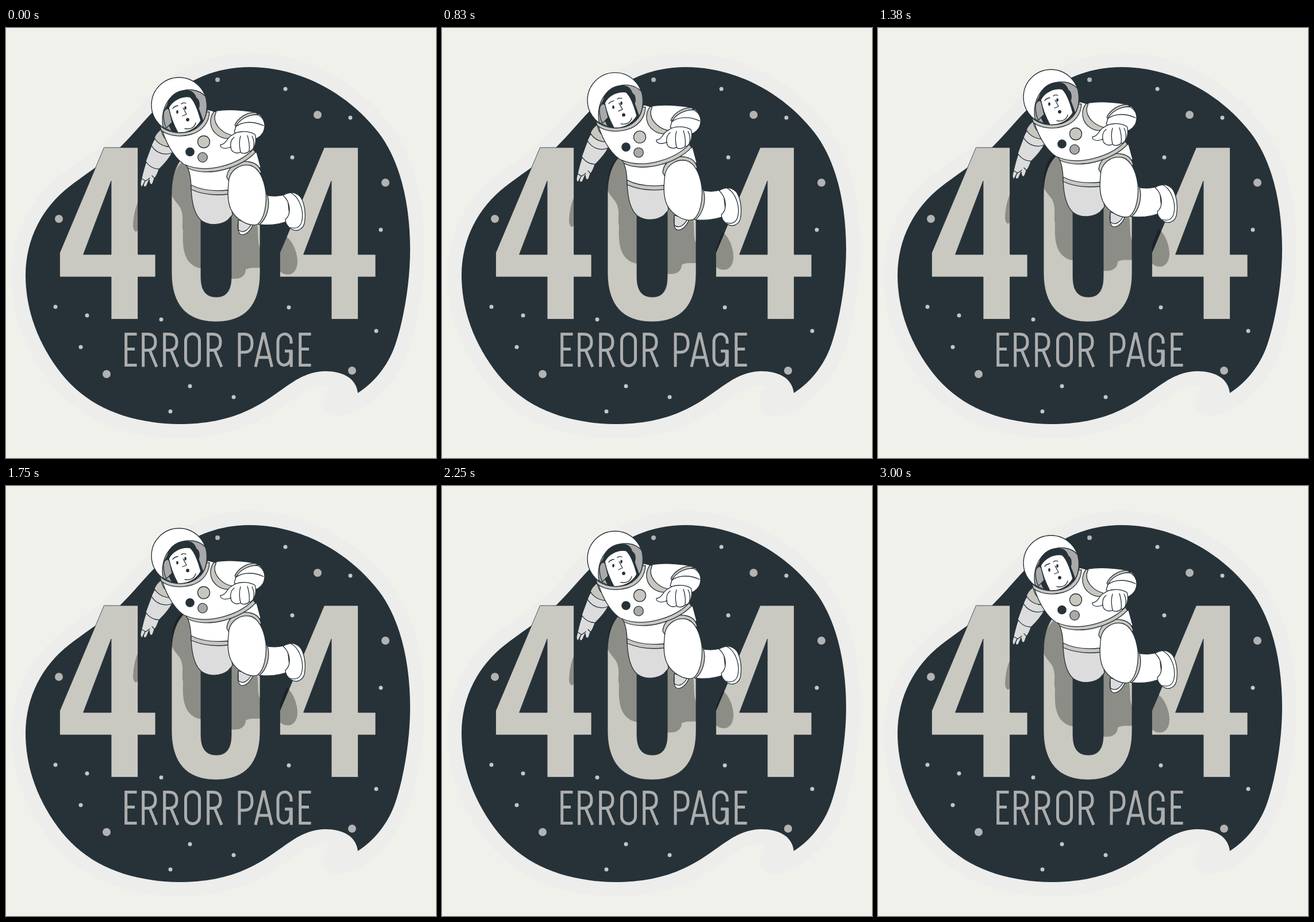
An HTML page that plays this animation: 748 by 748 pixels, repeating every 3040 ms.

```html
<!DOCTYPE html>
<html lang="en">
<head>
<meta charset="utf-8">
<title>Error page</title>
<style>
html, body { margin: 0; width: 100%; height: 100%; overflow: hidden; background: #f0f1eb }
svg { display: block; width: 100%; height: 100% }
.ink { fill: #263238 }
.digit { fill: #cac9c1; stroke: #263238; stroke-width: .8; fill-rule: evenodd }
.letters { fill: none; stroke: #adadad; stroke-width: 5 }
#hero { stroke: #263238; stroke-width: 1.3; stroke-linejoin: round; stroke-linecap: round; fill: #fff }
#hero .shadow { fill: #000; fill-opacity: .3; stroke: none }
#hero .pale { fill: #dcdcdc }
#hero .band { fill: #c8c7bf }
#hero .gray { fill: #a9a9a9 }
#hero .dark { fill: #263238 }
#hero .line { fill: none }
</style>
</head>
<body>
<svg viewBox="0 0 748 748">
  <defs>
    <path id="blob" d="M424 68C505 68 590 108 648 182C688 234 703 312 703 385C703 440 693 500 680 542C668 583 644 614 612 635C609 608 584 597 556 597C504 597 478 640 421 665C385 682 345 689 300 689C205 687 135 655 90 593C55 545 34 490 34 429C35 365 63 313 110 276C150 245 172 234 200 206C230 176 247 152 274 128C317 89 366 68 424 68Z"/>
    <path id="four" d="M170.500 208H229.500V394H260V433H229.500V506.500H183V433H93.500V391ZM183 266L134.500 394H183Z"/>
  </defs>

  <g fill="#ededec">
    <use href="#blob" stroke="#ededec" stroke-width="50" stroke-linejoin="round"/>
    <path d="M563 624C552 635 548 656 557 667C567 678 587 676 604 669C630 660 648 642 662 620L600 600Z"/>
  </g>
  <use href="#blob" class="ink"/>
  <g id="stars"></g>

  <use href="#four" class="digit"/>
  <use href="#four" class="digit" x="383"/>
  <path class="digit" d="M288 288C288 232 315 203 365 203C416 203 442 232 442 288V426C442 482 416 511 365 511C315 511 288 482 288 426ZM339 277V432C339 456 347 468 366 468C384 468 392 456 392 432V277C392 255 384 246 366 246C347 246 339 255 339 277Z"/>

  <g class="letters" role="img" aria-label="ERROR PAGE">
    <path id="e" d="M227.500 532.500H208.700V586.500H227.500M208.700 558.500H224"/>
    <path id="r" d="M238.700 589.500V532.500H246C256 532.500 260 537 260 546.500C260 556.500 255 560.500 246 560.500H238.700M250 560.500L262 589.500"/>
    <use href="#r" x="37"/>
    <rect x="312.500" y="532" width="24" height="55.500" rx="12"/>
    <use href="#r" x="113"/>
    <path d="M406 589.500V532.500H414C424 532.500 428 538 428 548.500C428 560 423 564 414 564H406"/>
    <path d="M434 589.500L447.500 532H449L462.500 589.500M438.500 573H458"/>
    <path d="M496 549V545C496 528 473 528 473 546V573C473 591 495 591 495 572V562H485M496.300 560V589.500"/>
    <use href="#e" x="303"/>
  </g>

  <g id="hero">
    <g class="shadow">
      <path d="M229.500 303C224 314 221 333 221 345C222 355 228 357 229.500 350Z"/>
      <path d="M306 234C293 244 288 262 288 290C292 302 304 308 306 321C309 334 305 343 308 353C307 375 308 392 317 405C323 413 331 417 339 418V300L322 250Z"/>
      <path d="M392 320V436C408 438 417 431 417 420C425 416 434 418 442 417V382C436 371 441 355 435 330Z"/>
      <path d="M488 363C499 371 507 391 507 407C506 431 488 433 477 424V391Z"/>
    </g>

    <!-- far leg and hips -->
    <path d="M404 336C402 347 404 356 408 359C417 362 426 352 430 341Z"/>
    <path class="pale" d="M404 334V351C413 359 422 350 427 341Z"/>
    <path class="pale" d="M322 278C323 306 329 326 340 335C354 345 374 343 386 334L394 325L388 285Z"/>
    <path d="M316 243C321 254 322 267 322 280C344 291 367 290 390 287L443 242L436 216Z"/>
    <path class="band" d="M322 273C343 284 366 284 386 282L387 289C364 292 343 290 322 281Z"/>

    <!-- near leg -->
    <path d="M449 290C466 294 478 293 489 288L494 334C480 341 465 344 441 342Z"/>
    <path d="M482 291C496 283 506 286 513 295C520 307 522 325 519 340C516 351 505 355 497 350C489 345 486 340 486 333C496 325 496 304 482 291Z"/>
    <path class="line" d="M494 286C510 293 518 316 515 334C513 347 504 350 495 347"/>
    <path class="band" d="M449 288L454 289C461 308 454 331 441 342L435 340C448 329 452 311 449 288Z"/>
    <path class="band" d="M384 260C385 240 406 229 424 233C435 235 442 242 444 252L390 270Z"/>
    <path d="M388 262C393 244 410 236 425 239C440 243 449 263 452 286C454 308 449 332 438 341C424 347 400 334 391 315C384 299 386 279 388 262Z"/>

    <!-- far arm -->
    <path class="pale" d="M244 232C240 244 237 256 235 265C233 271 234 277 237 276L242 266L239 273C240 278 244 278 246 271L249 264L250 270C252 274 255 272 256 268L258 262C263 257 265 249 267 243Z"/>
    <path class="line" d="M236 262L243 266L250 261M254 257L259 262"/>
    <path class="pale" d="M254 202C250 213 246 223 243 232C249 241 258 246 267 245C276 236 284 227 289 217Z"/>
    <path class="pale" d="M269 181C261 187 257 194 253 204C260 217 276 223 289 217L296 207L277 177Z"/>
    <path class="band" d="M270 176C263 181 260 186 258 191C264 202 278 209 292 206L287 198C278 196 272 190 270 176Z"/>

    <!-- chest -->
    <path d="M272 178C280 205 296 231 315 240C350 255 405 239 432 212L427 190L400 145L366 146L351 142L330 175Z"/>
    <path class="band" d="M312 238C349 254 404 238 430 211L434 216C409 244 350 260 317 244Z"/>
    <circle class="band" cx="344" cy="198" r="10.500"/>
    <circle class="dark" cx="320" cy="215.500" r="7.200"/>
    <circle class="gray" cx="342" cy="225" r="8.300"/>

    <!-- near arm -->
    <path class="band" d="M362 145C352 158 354 177 369 187C378 193 388 193 396 190L400 180L372 146Z"/>
    <path d="M366 144C386 141 411 143 430 146C447 149 453 164 448 176C443 190 427 197 412 195L398 187C379 186 362 170 363 154Z"/>
    <path class="band" d="M398 169C403 157 419 146 434 147L439 150C420 151 408 161 403 172Z"/>
    <path d="M400 171C407 158 423 150 438 151C450 157 453 170 447 182C441 192 431 195 421 194L397 181Z"/>
    <path class="line" d="M399 172C411 162 432 162 448 170"/>
    <path d="M394 186C402 179 421 178 433 185C436 193 434 205 430 210C427 214 424 215 423 214C419 219 411 219 408 216C400 220 391 215 391 207C380 212 372 208 373 203C383 203 384 190 394 186Z"/>
    <path class="line" d="M397 190C391 194 390 201 391 208M408 188C405 197 406 207 408 216M420 187C423 197 424 206 423 214M428 188C432 195 432 204 430 210"/>

    <!-- helmet and face -->
    <circle cx="301" cy="134" r="48"/>
    <path class="gray" d="M273 172C269 146 278 124 297 113C315 104 335 106 347 119C351 132 350 149 344 160C329 182 297 188 273 172Z"/>
    <path class="dark" d="M290 181C280 166 278 150 275 146C277 138 280 137 281 133C285 116 301 107 317 109C326 110 329 116 331 122C337 125 337 135 335 140L343 162L322 180Z"/>
    <path d="M283 139C289 126 305 118 320 120C328 126 334 143 339 161C330 177 314 183 299 182C292 169 286 154 283 139Z"/>
    <path class="gray" d="M274 151C274 142 281 137 284 143L289 164L279 174C276 168 274 160 274 151Z"/>
    <path class="line" d="M290 140Q293 136 299 135M305 132Q308 129 313 131M308 139L314 150L307 153M311 175C321 177 328 173 330 165"/>
    <g class="dark" stroke="none">
      <ellipse cx="298" cy="146" rx="1.800" ry="3"/>
      <ellipse cx="312" cy="139" rx="1.800" ry="3"/>
      <circle cx="316" cy="159.500" r="2.900"/>
    </g>
    <path class="band" d="M268 170C281 182 303 185 320 180C337 174 346 163 349 146L354 146C353 166 340 180 322 185C302 191 281 187 270 178Z"/>
  </g>
</svg>
<script>
const stars = [
  [368, 90, 4], [486, 106], [542, 151, 7], [599, 156], [498, 225], [660, 269, 7], [652, 351],
  [92, 332, 7], [86, 485], [141, 500], [270, 507], [130, 555], [175, 602, 7], [320, 623],
  [396, 642], [286, 667], [492, 486], [644, 527], [602, 596, 7]
];
document.getElementById('stars').innerHTML = stars.map(([x, y, r = 3.5]) =>
  `<circle cx="${x}" cy="${y}" r="${r}" fill="${r > 3.5 ? '#b3b3b3' : '#c6c6c1'}"/>`).join('');

const hero = document.getElementById('hero');
const LOOP = 3040, STEPS = 72, RISE = 15;

// Linear rise and fall at 24 steps a second
function draw() {
  const t = performance.now() % LOOP;
  const step = Math.min(STEPS, Math.floor((t + 4) * 0.024));
  const lift = RISE * (1 - Math.abs(1 - 2 * step / STEPS));
  hero.setAttribute('transform', `translate(0 ${-lift})`);
  requestAnimationFrame(draw);
}
draw();
</script>
</body>
</html>
```
